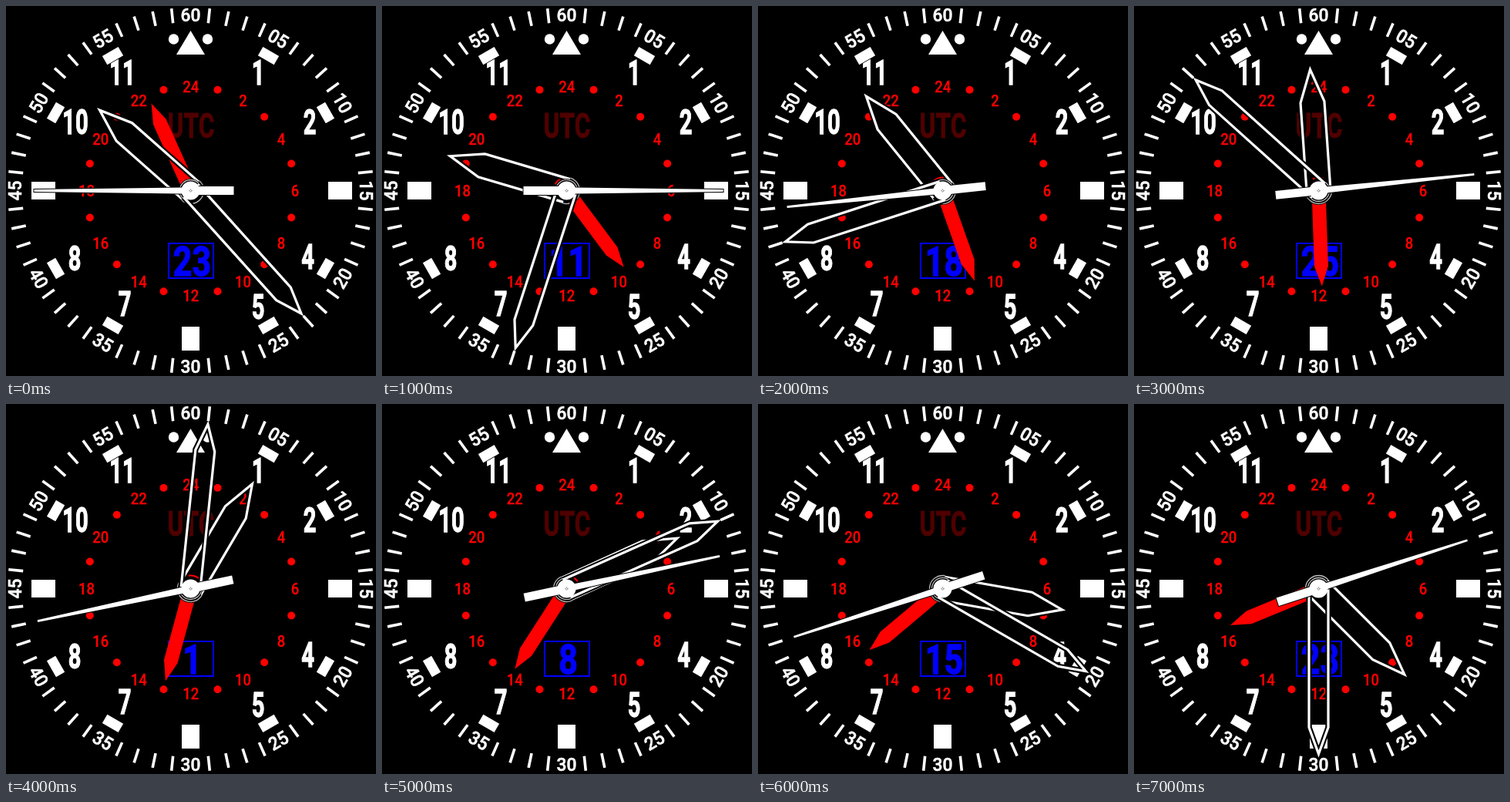
Write an HTML page that moves like this. It is 480 px wide and 480 px high and loops after 8000 ms.

```html
<!DOCTYPE html>
<html lang="en">
<head>
<meta charset="utf-8">
<title>Pilot watch dial</title>
<style>
  html, body { margin: 0; width: 100%; height: 100%; overflow: hidden; background: #000; }
  svg { display: block; width: 480px; height: 480px; }
  text { font-family: Roboto, "Liberation Sans", sans-serif; text-anchor: middle; }
  .minute { font-size: 24px; font-weight: 500; fill: #fff; stroke: #fff; stroke-width: .6; }
  .utc { font-size: 21px; font-weight: 500; fill: #f00; stroke: #f00; stroke-width: .3; }
  .hour { font-size: 43.5px; font-weight: 700; fill: #fff; stroke: #fff; stroke-width: 1.3; }
  .label { font-size: 43.5px; font-weight: 700; fill: #500000; stroke: #500000; stroke-width: .8; }
  .date { font-size: 53px; font-weight: 700; fill: #00f; stroke: #00f; stroke-width: 1.3; }
  .edge { fill: none; stroke: #000; stroke-width: 7.5; stroke-linejoin: round; }
  .line { fill: none; stroke: #fff; stroke-width: 3.2; stroke-miterlimit: 6; }
  .ring { fill: none; stroke: #bbb; stroke-width: 1.3; }
</style>
</head>
<body>
<svg viewBox="0 0 480 480">
  <g id="dial"></g>
  <g transform="translate(239.5 239.5)">
    <g id="utcHand">
      <path fill="#f00" d="M0-124L9-98V-12H-9V-98Z"/>
      <path d="M-7 15.5A17 17 0 0 0 7 15.5" fill="none" stroke="#f00" stroke-width="2"/>
    </g>
    <circle r="15" fill="#000"/>
    <g id="hourHand"></g>
    <g id="minuteHand"></g>
    <g id="secondHand">
      <path d="M-5.5 56H5.5V0L4-12 1.4-203H-1.4L-4-12-5.5 0Z" fill="#fff" stroke="#000" stroke-width="2" paint-order="stroke"/>
    </g>
    <circle r="12" fill="#fff"/>
    <circle r="1.5" fill="none" stroke="#000" stroke-width=".8" stroke-dasharray="1 1"/>
  </g>
</svg>
<script>
const C = 239.5;
const $ = id => document.getElementById(id);
const dial = $('dial');

function add(parent, tag, attrs) {
  const el = document.createElementNS('http://www.w3.org/2000/svg', tag);
  for (const k in attrs) el.setAttribute(k, attrs[k]);
  return parent.appendChild(el);
}

function polar(deg, r) {
  const a = deg * Math.PI / 180;
  return [C + r * Math.sin(a), C - r * Math.cos(a)];
}

// condense gives the narrow look of the dial lettering
function label(cls, str, x, y, size, condense, turn = 0) {
  const el = add(dial, 'text', {
    class: cls, y: size * .355,
    transform: `translate(${x} ${y}) rotate(${turn}) scale(${condense} 1)`
  });
  el.textContent = str;
  return el;
}

function block(deg, r, w, h) {
  add(dial, 'rect', {
    x: C - w / 2, y: C - r - h / 2, width: w, height: h,
    fill: '#fff', transform: `rotate(${deg} ${C} ${C})`
  });
}

function dot(x, y, r, fill) {
  add(dial, 'circle', { cx: x, cy: y, r, fill });
}

function minuteScale() {
  for (let m = 1; m <= 60; m++) {
    const deg = m * 6;
    if (m % 5) { block(deg, 228, 3.6, 19); continue; }
    const flip = m > 15 && m < 45;
    label('minute', String(m).padStart(2, '0'), ...polar(deg, 227.7), 24, .95, flip ? deg - 180 : deg);
  }
}

function hourMarks() {
  for (let h = 1; h < 12; h++) {
    if (h % 3) block(h * 30, 202, 24, 13);
    else block(h * 30, h === 6 ? 192 : h === 3 ? 194 : 191, 23, 31);
  }
  add(dial, 'path', { d: `M${C} 32L258 63H221Z`, fill: '#fff' });
  dot(217.5, 43, 6.7, '#fff');
  dot(261.5, 43, 6.7, '#fff');
  const places = { 1: [327, 87], 2: [394, 151], 4: [391.5, 325.5], 5: [327, 390.5],
                   7: [154, 387], 8: [89, 327.5], 10: [90, 150.5], 11: [151, 87] };
  for (const h in places) label('hour', h, ...places[h], 43.5, .67);
}

function utcScale() {
  for (let h = 1; h <= 24; h++) {
    const [x, y] = polar(h * 15, 135.3);
    if (h % 2) dot(x, y, 5, '#f00');
    else label('utc', h, x + .3, y + .5, 21, .88);
  }
}

// Open hand: pointed outline with thin rings behind the hub
function openHand(id, tip, shoulder, half) {
  const g = $(id);
  const d = `M${-half} 0V${-shoulder}L0 ${-tip}L${half} ${-shoulder}V0`;
  const arc = r => `M${-r} 0A${r} ${r} 0 0 0 ${r} 0`;
  add(g, 'path', { class: 'edge', d });
  add(g, 'path', { d: arc(half + 3), fill: '#000' });
  add(g, 'path', { class: 'ring', d: arc(half + 1.5) });
  add(g, 'path', { class: 'line', d });
}

minuteScale();
hourMarks();
utcScale();
label('label', 'UTC', 240, 155.5, 43.5, .73);
const date = label('date', '', 241.5, 331, 53, .81);
add(dial, 'rect', { x: 211, y: 308, width: 58, height: 45, fill: 'none', stroke: '#00f', 'stroke-width': 2 });
openHand('hourHand', 157.5, 115, 15.5);
openHand('minuteHand', 214.5, 180, 12.5);

// hour, minute, second, day
const times = [
  [22, 23, 45, 23], [9, 33, 15, 11], [10, 42, 44, 18], [11, 52, 14, 25],
  [13, 1, 43, 1], [14, 11, 13, 8], [15, 20, 42, 15], [16, 30, 12, 23]
];
const turn = (id, deg) => $(id).setAttribute('transform', `rotate(${deg})`);
let shown = -1;
let start;

function tick(now) {
  start ??= now;
  const step = Math.floor(Math.max(0, now - start) / 1000) % times.length;
  if (step !== shown) {
    shown = step;
    const [h, m, s, day] = times[step];
    turn('utcHand', h * 15 + m / 4);
    turn('hourHand', h * 30 + m / 2);
    turn('minuteHand', m * 6);
    turn('secondHand', s * 6);
    date.textContent = day;
  }
  requestAnimationFrame(tick);
}
tick(performance.now());
</script>
</body>
</html>
```
